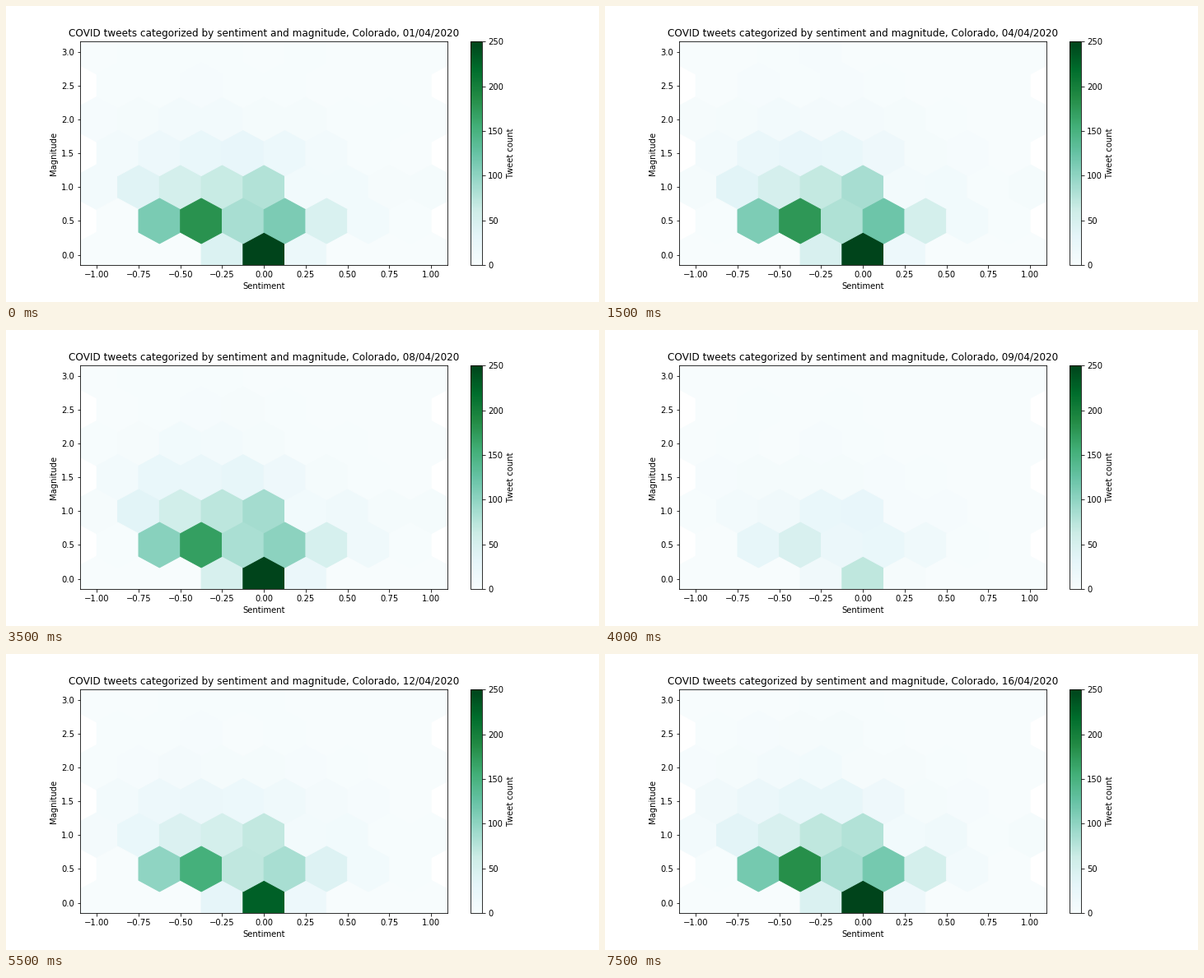
A matplotlib script for the animation above (8000 ms loop, 720x360 px).

```python
import numpy as np
import matplotlib.pyplot as plt
from matplotlib.animation import FuncAnimation

DAYS = 16
VMAX = 250

plt.rcParams["font.family"] = "DejaVu Sans"
plt.rcParams["text.kerning_factor"] = 6

# Typical day: sentiment -> tweet count along the three busy rows
PROFILES = {
    0.0: ([-0.5, -0.25, 0, 0.25, 0.5], [0, 46, 275, 20, 0]),
    0.5: ([-0.875, -0.625, -0.375, -0.125, 0.125, 0.375, 0.625, 0.875],
          [1, 112, 182, 84, 108, 50, 10, 1]),
    1.0: ([-1, -0.75, 0, 0.25, 0.5, 0.75], [7, 36, 80, 11, 16, 4]),
}


def typical_count(x, y):
    row = round(2 * y) / 2
    if row in PROFILES:
        return np.interp(x, *PROFILES[row])
    return 28 * np.exp(-2 * (y - 1.5) - ((x + 0.3) / 0.6) ** 2)


def activity(day):
    """Share of the usual traffic, with a slump in the second week."""
    return np.interp(day, [8, 9, 11, 12, 13], [1, 0.27, 0.4, 0.8, 1])


def day_counts(day):
    rng = np.random.default_rng(day)
    mean = activity(day) * typical
    return np.maximum(rng.normal(mean, 0.6 * np.sqrt(mean)), 0)


fig, ax = plt.subplots(figsize=(10, 5), dpi=72)
fig.subplots_adjust(left=0.125, right=0.9, bottom=0.125, top=0.88)

hexes = ax.hexbin([0], [0], gridsize=(8, 3), extent=(-1, 1, 0, 3),
                  cmap="BuGn", vmin=0, vmax=VMAX)
typical = np.array([typical_count(x, y) for x, y in hexes.get_offsets()])

ax.set(xlim=(-1.1, 1.1), ylim=(-0.15, 3.15),
       xticks=np.arange(-1, 1.01, 0.25), yticks=np.arange(0, 3.01, 0.5),
       xlabel="Sentiment", ylabel="Magnitude")
fig.colorbar(hexes, ax=ax, label="Tweet count", ticks=range(0, VMAX + 1, 50))


def draw(i):
    hexes.set_array(day_counts(i + 1))
    ax.set_title("COVID tweets categorized by sentiment and magnitude, "
                 f"Colorado, {i + 1:02d}/04/2020")


anim = FuncAnimation(fig, draw, frames=DAYS, interval=500, repeat=True,
                     repeat_delay=0)
plt.show()
```
